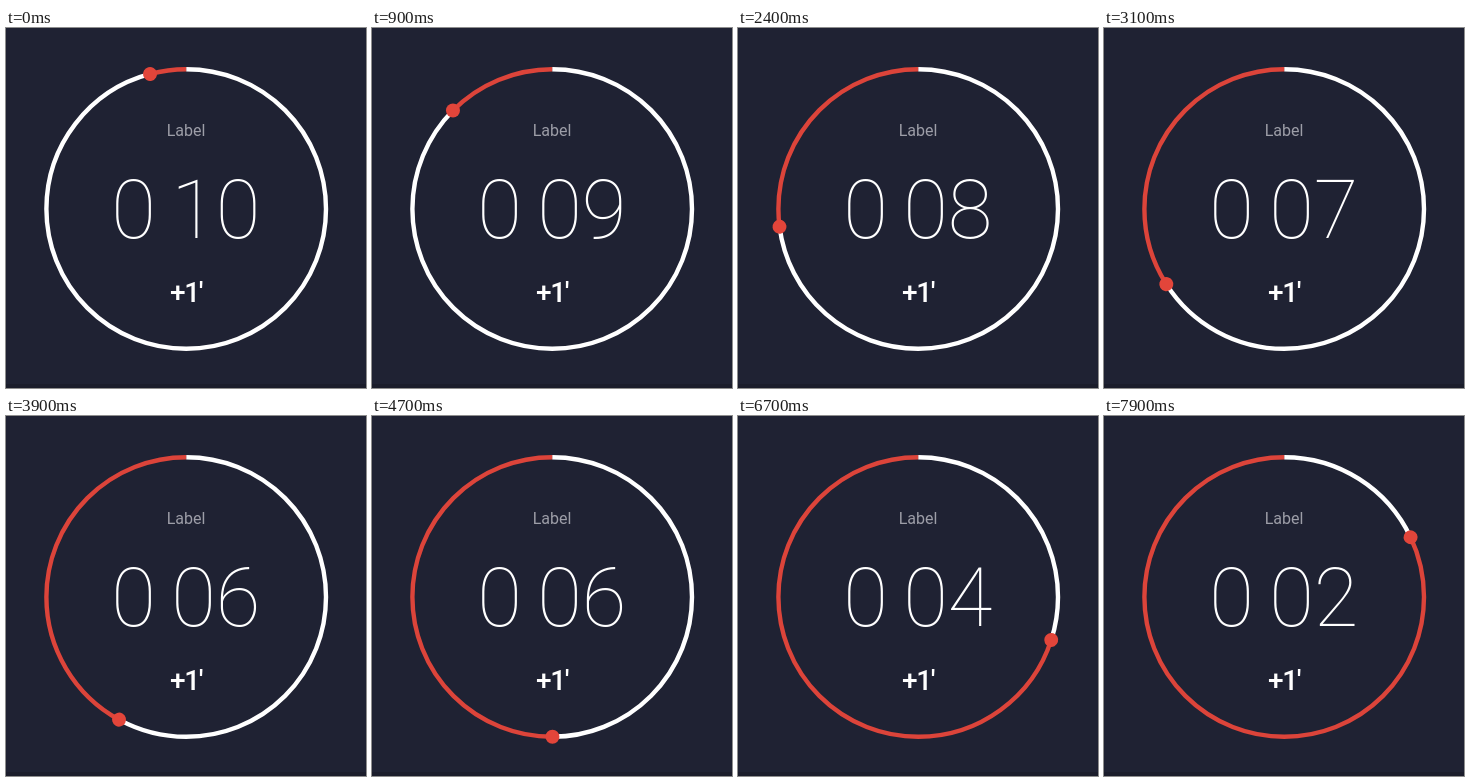
Animation of 360 by 360 pixels, one loop 8000 ms. Source, as an HTML page:

```html
<!DOCTYPE html>
<html lang="en">
<head>
<meta charset="utf-8">
<title>Countdown timer</title>
<style>
  html, body { margin: 0; width: 100%; height: 100%; overflow: hidden; background: #1f2233; }
  svg { display: block; width: 360px; height: 360px; }
  text { font-family: Roboto, sans-serif; text-anchor: middle; fill: #fff; }
  circle { fill: none; stroke-width: 4.4; }
  #soft { filter: blur(0.55px); }
  #count { font-size: 81.5px; font-weight: 100; word-spacing: -4px; white-space: pre; }
  #label { font-size: 16px; fill: #9d9ea8; }
  #add { font-size: 28px; font-weight: 500; letter-spacing: -1.5px; }
</style>
</head>
<body>
<svg viewBox="0 0 360 360">
  <rect y="356" width="360" height="4" fill="#1b1d2b"/>
  <g id="soft">
    <!-- Mirrored so that the progress runs counterclockwise from the top -->
    <g transform="translate(180.2 181) scale(-1 1) rotate(-90)">
      <circle id="rest" r="139.8" stroke="#fff" pathLength="360"/>
      <circle id="arc" r="139.8" stroke="#dc443a" pathLength="360"/>
      <circle id="dot" cx="139.8" r="7" style="fill:#e2453a"/>
    </g>
    <text id="label" x="180" y="107.7">Label</text>
    <text id="count" x="179.8" y="209.5">0 10</text>
    <text id="add" x="180" y="273.5">+1'</text>
  </g>
</svg>
<script>
  const LOOP = 8000, STEP = 100;
  const [rest, arc, dot, count] = ['rest', 'arc', 'dot', 'count'].map(id => document.getElementById(id));
  const start = performance.now();

  // Degrees travelled: a slightly slower start, then one turn in ten seconds
  const angleAt = t => t < 1700 ? 15 + t * 57.1 / 1700 : 72.1 + (t - 1700) * 0.036;

  // The ticks of the counter run a little longer than a second
  const secondsAt = t => 10 - Math.max(0, Math.floor((t - 640) / 1025) + 1);

  function draw(now) {
    const t = Math.floor(Math.max(0, now - start) % LOOP / STEP) * STEP;
    const angle = angleAt(t);
    arc.setAttribute('stroke-dasharray', `${angle} 360`);
    rest.setAttribute('stroke-dasharray', `0 ${angle} ${360 - angle} 0`);
    dot.setAttribute('transform', `rotate(${angle})`);
    count.textContent = '0 ' + String(secondsAt(t)).padStart(2, '0');
    requestAnimationFrame(draw);
  }
  draw(start);
</script>
</body>
</html>
```
